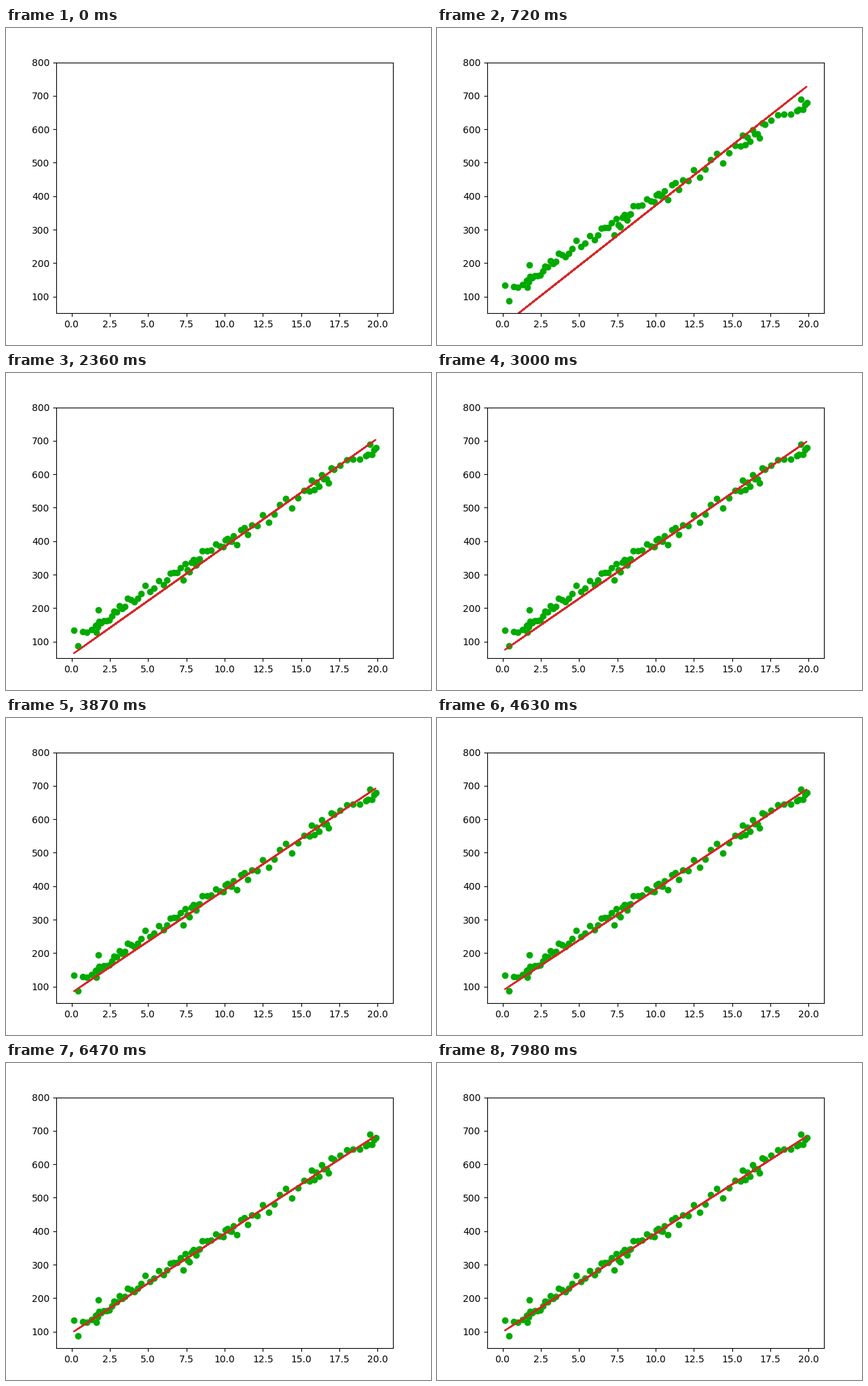
A matplotlib script for the animation above (8 s loop, 626 by 467 pixels).

```python
import matplotlib.pyplot as plt
import numpy as np
from matplotlib.animation import FuncAnimation

W, H, DPI = 626, 467, 100
LEFT, BOTTOM, AX_W, AX_H = 74, 46.79, 496, 369.6
TICK_MS, LOOP_MS = 20, 8000
FIRST_MS, FIT_MS = 500, 126.7
SLOPE, INTERCEPT = 29.2, 101.6
COUNT = 92

# Evenly spaced quantiles of x: dense and sparse stretches of the samples
X_QUANTILES = [0.15, 1.6, 1.8, 2.65, 3.5, 4.6, 6.1, 7.2, 7.9, 8.4,
               9.85, 10.5, 11.65, 13.5, 15.5, 16.3, 17.1, 19.2, 19.87]


def make_samples(rng):
    rank = np.linspace(0, len(X_QUANTILES) - 1, COUNT)
    x = np.interp(rank, np.arange(len(X_QUANTILES)), X_QUANTILES)
    y = INTERCEPT + SLOPE * x + rng.normal(2.5, 12, COUNT)
    order = rng.permutation(COUNT)
    return x[order], y[order]


def fit_line(step):
    """Slope and intercept after some steps of gradient descent."""
    error = 0.943 ** step
    return SLOPE + 7.65 * error, INTERCEPT - 100.5 * error


xs, ys = make_samples(np.random.default_rng(3))

fig = plt.figure(figsize=(W / DPI, H / DPI), dpi=DPI)
ax = fig.add_axes([LEFT / W, BOTTOM / H, AX_W / W, AX_H / H])
ax.set_xlim(-1, 21)
ax.set_ylim(50, 800)
dots, = ax.plot(xs, ys, "o", color="#00aa00")
line, = ax.plot(xs, ys, color="tab:red")


def draw(i):
    t = (i + 0.5) * TICK_MS
    started = t >= FIRST_MS
    dots.set_visible(started)
    line.set_visible(started)
    if started:
        slope, intercept = fit_line((t - FIRST_MS) // FIT_MS + 1)
        line.set_ydata(intercept + slope * xs)
    return dots, line


anim = FuncAnimation(fig, draw, frames=LOOP_MS // TICK_MS,
                     interval=TICK_MS, repeat=True, repeat_delay=0)
plt.show()
```
